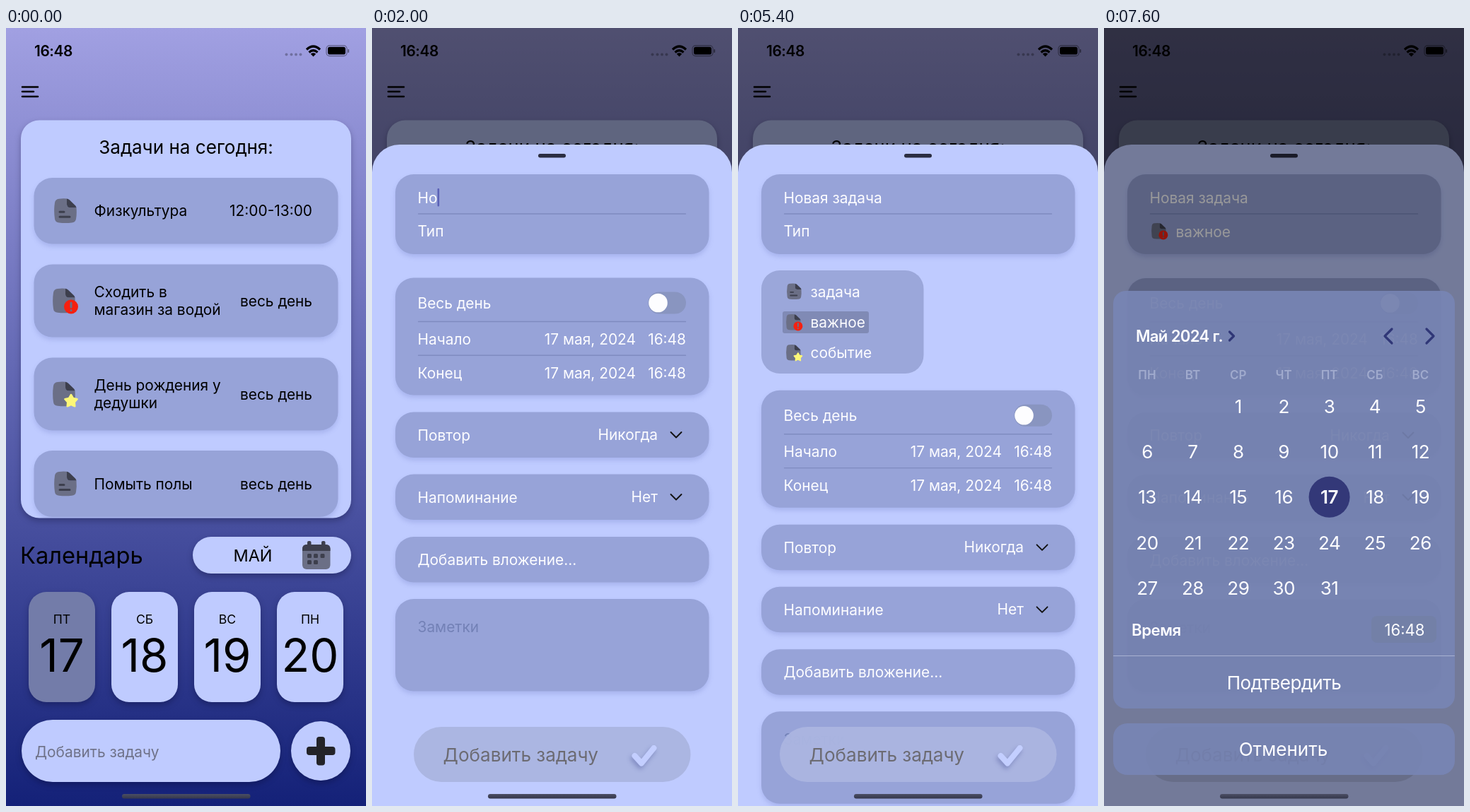
Recreate the animation shown at these times as an HTML page. Size 509 by 1101 pixels, loop 8000 ms.

```html
<!DOCTYPE html>
<html lang="ru">
<head>
<meta charset="utf-8">
<title>Планировщик</title>
<style>
html, body { margin: 0; width: 100%; height: 100%; overflow: hidden; background: #13217a; }
svg { display: block; width: 100vw; height: 100vh; font-family: Inter, sans-serif; }
text { white-space: pre; }
.soft { filter: drop-shadow(0 4px 3px rgba(50, 60, 150, .16)); }
.deep { filter: drop-shadow(0 4px 4px rgba(0, 0, 30, .28)); }
.line { fill: none; stroke-linecap: round; stroke-linejoin: round; }
</style>
</head>
<body>
<svg id="stage" viewBox="0 0 509 1101" preserveAspectRatio="none"></svg>
<script>
const PT = 1.305;
const PALE = '#bfcbff', CARD = '#97a3d8', GRAY = '#6b6f86', DARK = '#3d3f4d', WHITE = '#fdfdff', NAVY = '#303777';

const box = (x, y, w, h, r, fill, extra = '') =>
  `<rect x="${x}" y="${y}" width="${w}" height="${h}" rx="${r}" fill="${fill}" ${extra}/>`;

// y is the middle of the capital letters
const text = (s, x, y, pt = 16, fill = '#000', extra = '') =>
  `<text x="${x}" y="${y + pt * PT * .364}" font-size="${pt * PT}" fill="${fill}" ${extra}>${s}</text>`;
const END = 'text-anchor="end"', MID = 'text-anchor="middle"', SEMI = 'font-weight="600"', TIGHT = 'letter-spacing="-.02em"';

const stroke = (d, color, width, extra = '') =>
  `<path class="line" d="${d}" stroke="${color}" stroke-width="${width}" ${extra}/>`;
const group = (id, body, extra = '') => `<g id="${id}" ${extra}>${body}</g>`;

const starPoints = Array.from({ length: 10 }, (_, i) => {
  const a = i * Math.PI / 5, r = i % 2 ? 5 : 9;
  return `${(26 + r * Math.sin(a)).toFixed(1)},${(27.5 - r * Math.cos(a)).toFixed(1)}`;
}).join(' ');

const marks = {
  task: stroke('M8 19H14M8 26H22', DARK, 3),
  urgent: '<circle cx="26" cy="26" r="10" fill="#f6200f"/>' + stroke('M26 20.5V26.5M26 31V31.2', GRAY, 3),
  event: `<polygon points="${starPoints}" fill="#fdf778" stroke="#fdf778" stroke-width="2.5" stroke-linejoin="round"/>`
};
const note = (kind, x, y, k = 1) => `<g transform="translate(${x} ${y}) scale(${k})">
  <path fill="${GRAY}" d="M7 .5Q13 -.5 18 .3V8Q18 13 23 13H31.5Q32.3 22 31 29Q30.3 34 25 34.3Q16 35.3 7 34.3Q1.7 34 1 29Q-.7 17 1 6Q1.7 1 7 .5Z"/>
  <path fill="${DARK}" d="M18 .3Q20.5 .8 22 2.2L30 10Q31.3 11.4 31.5 13H23Q18 13 18 8Z"/>${marks[kind]}</g>`;

function home() {
  const row = (y, h, kind, lines, when) => {
    const mid = y + h / 2, left = kind == 'task' ? 68 : 66;
    return box(39.5, y, 430, h, 26, CARD, 'class="soft"') + note(kind, left, mid - 17.5) +
      lines.map((s, i) => text(s, 124.5, mid + (i - (lines.length - 1) / 2) * 25.2)).join('') +
      text(when, 433, mid, 16, '#000', END);
  };
  const day = ([name, num], i) => {
    const x = 32 + i * 117;
    return box(x, 798, 94, 156, 25, i ? PALE : '#737ca9', 'class="deep"') +
      text(name, x + 47, 837, 13.5, '#000', MID) + text(num, x + 47, 887, 50, '#000', MID);
  };
  const dots = [[429, 747], [438, 747], [447.5, 747], [429, 756], [438, 756]];
  return box(0, 0, 509, 1101, 0, 'url(#sky)') +
    stroke('M23 83.5H45M23 90H39M23 97H45', '#000', 2.6) +
    box(21, 130.5, 467, 563, 26, PALE, 'class="deep"') +
    text('Задачи на сегодня:', 254.5, 168, 20, '#000', MID) +
    '<g clip-path="url(#list)">' +
    row(212, 93.5, 'task', ['Физкультура'], '12:00-13:00') +
    row(334.5, 103, 'urgent', ['Сходить в', 'магазин за водой'], 'весь день') +
    row(466.5, 103, 'event', ['День рождения у', 'дедушки'], 'весь день') +
    row(598, 94, 'task', ['Помыть полы'], 'весь день') + '</g>' +
    text('Календарь', 20, 746, 25) +
    box(264, 720, 224, 52, 26, PALE, 'class="deep"') + text('МАЙ', 349, 746.5, 18, '#000', MID) +
    box(419, 731, 39.5, 35, 6, GRAY) +
    `<path fill="${DARK}" d="M419 740V737Q419 731 425 731H452.5Q458.5 731 458.5 737V740Z"/>` +
    box(426, 726, 5.5, 9, 2, DARK) + box(446, 726, 5.5, 9, 2, DARK) +
    dots.map(([x, y]) => box(x - 3, y - 3, 6, 6, 1.5, DARK)).join('') +
    [['ПТ', 17], ['СБ', 18], ['ВС', 19], ['ПН', 20]].map(day).join('') +
    box(22, 979, 366, 88, 44, PALE, 'class="deep"') + text('Добавить задачу', 41, 1024, 16, '#6f7288') +
    `<circle class="deep" cx="445" cy="1023" r="42" fill="${PALE}"/>` +
    box(425, 1017, 40.5, 12, 4, '#232328') + box(439, 1003, 12, 40.5, 4, '#232328');
}

function sheet() {
  const card = (y, h, id = '') => box(33, y, 443.5, h, 26, CARD, `class="soft" ${id}`);
  const label = (s, y) => text(s, 64.5, y, 16, WHITE);
  const rule = y => stroke(`M65.5 ${y}H443.5`, '#7f8bc0', 1.4);
  const date = y => text('17 мая, 2024', 373, y, 16, WHITE, END) + text('16:48', 444, y, 16, WHITE, END);
  const pick = (s, value, y) => card(y - 32.5, 64.5) + label(s, y) + text(value, 404, y - .5, 16, WHITE, END) +
    stroke(`M422.5 ${y - 4}L430 ${y + 3.5}L437.5 ${y - 4}`, '#111', 1.9);
  const option = (kind, s, y) => note(kind, kind == 'task' ? 69 : 68, y - 11.5, .65) + text(s, 102.5, y, 16, WHITE);

  return box(0, 165, 509, 1100, 39, PALE) + box(235, 178, 39, 5.5, 2.7, '#2b2d42') +
    card(207, 113) + rule(263) + text('', 64.5, 240, 16, WHITE, 'id="name"') +
    box(92, 227, 2.6, 25.5, 1, '#5b61b6', 'id="caret"') +
    group('type', box(63, 272, 42, 30, 3, '#6f779d', 'id="typePress"') + text('Тип', 64.5, 287.5, 16, WHITE, 'id="typeLabel"')) +
    group('chosen', note('urgent', 67, 276, .65) + text('важное', 101.5, 288, 16, WHITE)) +
    group('menu', box(33, 343, 229.5, 146, 26, '#9ba7da') +
      box(63, 401, 122, 31, 3, '#6f779d', 'id="menuPress"') +
      option('task', 'задача', 373) + option('urgent', 'важное', 416.5) + option('event', 'событие', 459.5)) +
    group('rest', card(353.5, 166) + label('Весь день', 389) +
      box(390.5, 373.5, 53.5, 31, 15.5, '#8995c0') + `<circle cx="404.5" cy="389" r="13.3" fill="${WHITE}"/>` +
      rule(415.5) + label('Начало', 440) + date(440) + rule(463.3) + label('Конец', 488) + date(488) +
      pick('Повтор', 'Никогда', 576) + pick('Напоминание', 'Нет', 664) +
      card(720, 64.5) + label('Добавить вложение...', 752.5) +
      card(808, 130.5) + text('Заметки', 64.5, 847.5, 16, '#7381b6')) +
    box(59, 989, 391.5, 78, 39, '#abb6e1', 'opacity=".96"') + text('Добавить задачу', 100.5, 1028.5, 20, '#6c6b72') +
    stroke('M371.5 1030L381 1040.5L398.5 1019', '#c3ceff', 8, 'style="filter:drop-shadow(-2px 4px 3px rgba(70,80,150,.4))"');
}

function picker() {
  const panel = '#7886b5', colX = i => 61 + 64.4 * i;
  const arrow = (x, y, s, dir) => stroke(`M${x} ${y - s}l${dir * s} ${s}l${-dir * s} ${s}`, NAVY, 3.2);
  let out = box(13, 372, 483, 591, 18, panel, 'opacity=".9"') +
    text('Май 2024 г.', 45, 436, 17, WHITE, `${SEMI} letter-spacing="-.03em"`) + arrow(177.5, 436, 6, 1) +
    arrow(407, 436, 10, -1) + arrow(456, 436, 10, 1);
  'ПН ВТ СР ЧТ ПТ СБ ВС'.split(' ').forEach((s, i) => out += text(s, colX(i), 491, 13, '#a0aacd', `${SEMI} ${MID}`));
  for (let d = 1; d <= 31; d++) {
    const x = colX((d + 1) % 7), y = 535 + 64.35 * Math.floor((d + 1) / 7), today = d == 17;
    if (today) out += `<circle cx="${x}" cy="${y}" r="29" fill="#333878"/>`;
    out += text(d, x, y, 20, WHITE, MID + ' ' + TIGHT + (today ? ' ' + SEMI : ''));
  }
  return out + text('Время', 39, 851.5, 17, WHITE, `${SEMI} ${TIGHT}`) +
    box(378, 832, 92, 38, 8, '#7380a7') + text('16:48', 425, 851.5, 17, WHITE, MID) +
    stroke('M13.5 888.5H495.5', '#a9b2d2', 1) + text('Подтвердить', 254.5, 926, 20, WHITE, `${MID} ${TIGHT}`) +
    box(13, 984, 483, 73, 20, panel, 'opacity=".9"') + text('Отменить', 253.5, 1020.5, 20, WHITE, MID);
}

const statusBar = () => text('16:48', 40, 32.5, 16, '#000', `${SEMI} ${TIGHT}`) +
  [397, 404, 410.5, 417].map(x => `<circle cx="${x - .5}" cy="37.5" r="2" fill="#000" opacity=".28"/>`).join('') +
  '<g fill="none" stroke="#000" stroke-width="3.2"><path d="M425 30.5Q434.5 21.5 444 30.5"/><path d="M428.5 34.5Q434.5 29 440.5 34.5"/></g>' +
  '<path d="M434.5 40.5L430.8 36.7Q434.5 33.8 438.2 36.7Z"/>' +
  box(453, 24.8, 29, 14.8, 4.5, 'none', 'stroke="#000" stroke-opacity=".4" stroke-width="1.2"') +
  box(455, 26.8, 25, 10.8, 2.8, '#000') + box(483.3, 30, 1.8, 5, .9, '#000', 'opacity=".45"') +
  box(164, 1084, 181.5, 6.5, 3.2, 'url(#bar)');

document.getElementById('stage').innerHTML = `<defs>
  <linearGradient id="sky" x2="0" y2="1"><stop stop-color="#a1a0e2"/><stop offset="1" stop-color="#142178"/></linearGradient>
  <linearGradient id="bar" x2="0" y2="1"><stop stop-color="#4b4e64"/><stop offset="1" stop-color="#35384c"/></linearGradient>
  <clipPath id="list">${box(21, 130.5, 467, 563, 26, '#000')}</clipPath></defs>` +
  home() + box(0, 0, 509, 1101, 0, '#000', 'id="dim"') + group('sheet', sheet()) +
  box(0, 0, 509, 1101, 0, '#000', 'id="dim2"') + group('picker', picker()) + statusBar();

const $ = id => document.getElementById(id);
const alpha = (id, v) => $(id).setAttribute('opacity', v);
const moveY = (id, y) => $(id).setAttribute('transform', `translate(0 ${y})`);
const part = (t, from, to) => Math.min(1, Math.max(0, (t - from) / (to - from)));
const inOut = p => p < .5 ? 2 * p * p : 1 - 2 * (1 - p) ** 2;

const TITLE = 'Новая задача';
const KEYS = [1800, 2000, 2200, 2400, 2500, 2700, 2800, 2900, 3100, 3300, 3400, 3500];

function draw(t) {
  const left = t < 500 ? 1 : Math.exp((460 - t) / 58);
  moveY('sheet', 940 * left);
  alpha('dim', .5 * (1 - left));

  const typed = KEYS.filter(k => k <= t).length;
  $('name').textContent = typed ? TITLE.slice(0, typed) : 'Название';
  $('caret').setAttribute('x', 64.5 + (typed ? $('name').getComputedTextLength() : 0));
  alpha('caret', t >= 1600 && t < 4200 ? 1 : 0);

  const picked = t >= 5500, press = t >= 4100 ? 1 - part(t, 4100, 4300) : 0;
  alpha('typePress', press * .8);
  alpha('typeLabel', 1 - press * .4);
  alpha('type', picked ? 0 : 1);
  alpha('chosen', picked ? 1 : 0);

  const open = inOut(part(t, 4100, 4400)) - inOut(part(t, 5400, 5600));
  alpha('menu', open);
  alpha('menuPress', t >= 5400 && t < 5500 ? .6 : 0);
  moveY('rest', 159.3 * open + (picked ? .5 : 0));

  const up = inOut(part(t, 7270, 7600));
  alpha('dim2', .4 * up);
  moveY('picker', 1101 * (1 - up));
}

const start = performance.now();
function tick() {
  draw(Math.floor((performance.now() - start) % 8000 / 100) * 100);
  requestAnimationFrame(tick);
}
tick();
</script>
</body>
</html>
```
